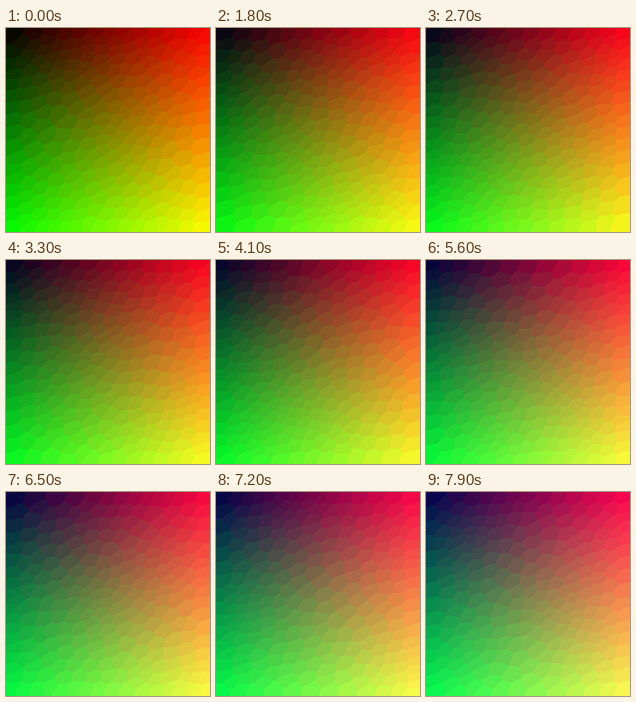
Animation, 256 px wide and 256 px high, one loop 8 s. Source, as an HTML page with a canvas:

```html
<!DOCTYPE html>
<html lang="en">
<head>
<meta charset="utf-8">
<title>Colour slices</title>
<style>
  html, body { margin: 0; width: 100%; height: 100%; overflow: hidden; background: #000; }
  canvas { display: block; width: 100vw; height: 100vh; image-rendering: pixelated; }
</style>
</head>
<body>
<canvas id="stage" width="256" height="256"></canvas>
<script>
const SIZE = 256, CELLS = 256, LOOP = 8000;
const ROUNDS = 14, STEP = 3;        // relaxation passes and their sampling grid
const TALL = 1.25, LEAN = 0.28;     // cells are wider than tall and rise to the right
const REACH = 48;                   // no cell extends further up or down than this
const ctx = document.getElementById('stage').getContext('2d');

// Start times of the slices: a few long holds, then one every 100 ms.
const starts = [0, 600, 1800, 2100];
for (let t = 2400; t < LOOP; t += 100) starts.push(t);
const slices = [];

function random(seed) {
  return () => {
    seed = (seed + 0x6D2B79F5) | 0;
    let v = Math.imul(seed ^ (seed >>> 15), seed | 1);
    v ^= v + Math.imul(v ^ (v >>> 7), v | 61);
    return ((v ^ (v >>> 14)) >>> 0) / 4294967296;
  };
}

// Call visit(x, y, nearest site) for every point of a grid.
function eachPoint(xs, ys, step, visit) {
  const near = new Int32Array(CELLS);
  for (let y = step >> 1; y < SIZE; y += step) {
    let n = 0;
    for (let i = 0; i < CELLS; i++) {
      if (Math.abs(ys[i] - y) < REACH) near[n++] = i;
    }
    for (let x = step >> 1; x < SIZE; x += step) {
      let low = Infinity, best = 0;
      for (let k = 0; k < n; k++) {
        const i = near[k], dx = x - xs[i];
        const dv = TALL * (y - ys[i]) + LEAN * dx;
        const d = dx * dx + dv * dv;
        if (d < low) { low = d; best = i; }
      }
      visit(x, y, best);
    }
  }
}

// Scatter sites, then move each to the middle of its cell until they are even.
function scatter(seed) {
  const rnd = random(seed);
  const xs = new Float64Array(CELLS), ys = new Float64Array(CELLS);
  for (let i = 0; i < CELLS; i++) {
    xs[i] = rnd() * SIZE;
    ys[i] = rnd() * SIZE;
  }
  for (let round = 0; round < ROUNDS; round++) {
    const sx = new Float64Array(CELLS), sy = new Float64Array(CELLS), count = new Int32Array(CELLS);
    eachPoint(xs, ys, STEP, (x, y, i) => {
      sx[i] += x;
      sy[i] += y;
      count[i]++;
    });
    for (let i = 0; i < CELLS; i++) {
      if (!count[i]) continue;
      xs[i] = sx[i] / count[i];
      ys[i] = sy[i] / count[i];
    }
  }
  return [xs, ys];
}

// Each cell takes the colour of its site: red = x, green = y.
function render(seed, blue) {
  const [xs, ys] = scatter(seed);
  const image = ctx.createImageData(SIZE, SIZE), data = image.data;
  eachPoint(xs, ys, 1, (x, y, i) => {
    const p = (y * SIZE + x) * 4;
    data[p] = xs[i];
    data[p + 1] = ys[i];
    data[p + 2] = blue;
    data[p + 3] = 255;
  });
  return image;
}

function slice(i) {
  return slices[i] || (slices[i] = render(i + 1, starts[i] / 100));
}

let shown = -1, ahead = 0;
function draw() {
  const t = performance.now() % LOOP;
  let i = starts.length - 1;
  while (starts[i] > t) i--;
  if (i !== shown) {
    ctx.putImageData(slice(i), 0, 0);
    shown = i;
  } else if (ahead < starts.length) {
    slice(ahead++); // prepare later slices while the picture holds
  }
  requestAnimationFrame(draw);
}
draw();
</script>
</body>
</html>
```
